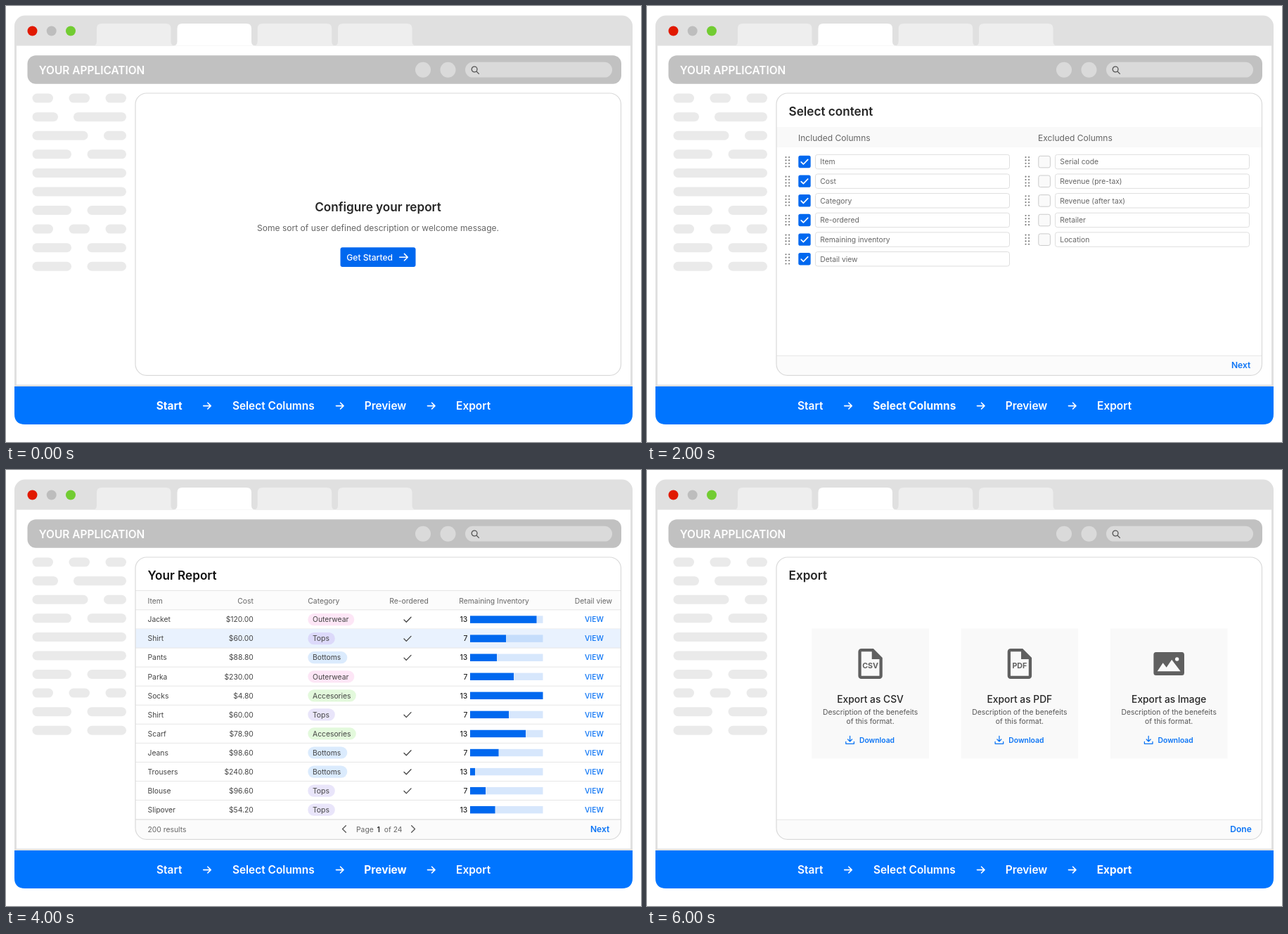
Recreate the animation shown at these times as an HTML page. Size 903 by 620 pixels, loop 8000 ms.

```html
<!DOCTYPE html>
<html lang="en">
<head>
<meta charset="utf-8">
<title>Report builder</title>
<style>
html, body { margin: 0; width: 100%; height: 100%; overflow: hidden; background: #fff; }
svg { display: block; width: 903px; height: 620px; font-family: Inter, sans-serif; }
.scene { visibility: hidden; animation: show 8s step-end infinite; }
.step { font-weight: 600; animation: strong 8s step-end infinite; }
@keyframes show { 0% { visibility: visible; } 25%, 100% { visibility: hidden; } }
@keyframes strong { 0% { font-weight: 700; } 25%, 100% { font-weight: 600; } }
</style>
</head>
<body>
<svg id="stage" viewBox="0 0 903 620"></svg>
<script>
const BLUE = '#0068ef', LINK = '#0b74f5', INK = '#262626', GREY = '#666', RULE = '#e6e6e6';
const XS = 10.34, SM = 12.07, MD = 13.8, LG = 15.45, XL = 17.15;

const rect = (x, y, w, h, fill, r = 0, more = '') =>
  `<rect x="${x}" y="${y}" width="${w}" height="${h}" rx="${r}" fill="${fill}" ${more}/>`;
const circle = (x, y, r, fill) => `<circle cx="${x}" cy="${y}" r="${r}" fill="${fill}"/>`;
const line = (d, color, width = 1, more = '') =>
  `<path d="${d}" fill="none" stroke="${color}" stroke-width="${width}" ${more}/>`;
const round = 'stroke-linecap="round" stroke-linejoin="round"';

// cy is the middle of the capital letters
const text = (s, x, cy, size, fill = INK, weight = 400, anchor = 'start', more = '') =>
  `<text x="${x}" y="${(cy + size * 0.364).toFixed(2)}" font-size="${size}" fill="${fill}" ` +
  `text-anchor="${anchor}" ${weight ? `font-weight="${weight}"` : ''} ${more}>${s}</text>`;

const delay = i => `style="animation-delay:${i * 2 - 8}s"`;
const arrow = (cx, cy, w, h, sw) =>
  line(`M${cx - w / 2} ${cy}h${w}m${-h} ${-h}l${h} ${h}l${-h} ${h}`, '#fff', sw, round);
const tick = (cx, cy, k, color, sw) =>
  line(`M${cx - 5 * k} ${cy + 0.4 * k}l${3.3 * k} ${3.3 * k}l${6.7 * k} ${-7 * k}`, color, sw, round);

function tab(x, fill) {
  return `<path fill="${fill}" d="M${x - 5} 56.5Q${x} 56 ${x} 50V32Q${x} 25 ${x + 7} 25h91.5` +
    `q7 0 7 7v18q0 6 5 6.5z"/>`;
}

function sidebar() {
  const three = [[37.5, 67], [89.5, 119], [141.5, 171]];
  const two = [[37.5, 93], [115.5, 171]];
  const full = [[37.5, 171]];
  const rows = [three, [[37.5, 74], [96, 171]], [[37.5, 116.5], [139, 171]], two, full, full, two, three, two, two];
  return rows.map((row, i) => row.map(([a, b]) =>
    rect(a, (124.6 + i * 26.57).toFixed(2), b - a, 13, '#eaeaea', 6.5)).join('')).join('');
}

function chrome() {
  return rect(12, 13.5, 879, 581.5, '#e0e0e0', 15) +
    rect(15, 56.5, 873, 482, '#fff') +
    circle(37.5, 35.5, 7, '#e11900') + circle(64.7, 35.5, 7, '#bdbdbd') + circle(92, 35.5, 7, '#72cc32') +
    [129, 243.5, 357.7, 472].map((x, i) => tab(x, i === 1 ? '#fff' : '#eee')).join('') +
    rect(30.5, 70.2, 844.5, 40.6, '#c1c1c1', 12) +
    text('YOUR APPLICATION', 46.7, 91, LG, '#fff', 600) +
    circle(593, 90.7, 11, '#dadada') + circle(628.5, 90.7, 11, '#dadada') +
    rect(653, 79.8, 209, 21.8, '#dadada', 10.9) +
    line('M670 90a3.9 3.9 0 1 1-7.8 0a3.9 3.9 0 1 1 7.8 0M669 93l3.4 3.4', '#555', 1.3, round) +
    sidebar() +
    rect(184, 124, 690.5, 401.3, '#fff', 16);
}

function steps() {
  const names = [['Start', 232.2], ['Select Columns', 380.3], ['Preview', 539.5], ['Export', 664.6]];
  return '<path fill="#0075ff" d="M12 541h879v39q0 15-15 15h-849q-15 0-15-15z"/>' +
    names.map(([s, x], i) => text(s, x, 568.2, LG, '#fff', 0, 'middle', `class="step" ${delay(i)}`)).join('') +
    [286, 474.7, 604.7].map(x => arrow(x, 568.6, 10.5, 4.4, 1.6)).join('');
}

const title = s => text(s, 201.5, 149.8, XL, INK, 600);
const foot = s => rect(184, 497, 691, 29, '#fbfbfb') + line('M184 497.3h691', RULE) +
  text(s, 844.6, 511, SM, LINK, 600, 'middle');

function start() {
  return text('Configure your report', 529, 286.2, XL, INK, 600, 'middle') +
    text('Some sort of user defined description or welcome message.', 529, 315.8, SM, GREY, 400, 'middle') +
    rect(475.5, 343.3, 107, 27.6, BLUE, 3) +
    text('Get Started', 484.3, 357.3, SM, '#fff', 500) +
    arrow(565.5, 357.2, 11.5, 4.8, 1.6);
}

function columnList(dx, head, items, on) {
  const dots = cy => [0, 1, 2, 3, 4, 5, 6, 7].map(n =>
    circle(197.5 + dx + (n % 2) * 4.6, cy - 6.5 + (n >> 1) * 4.4, 1.05, '#777')).join('');
  return text(head, 215 + dx, 188, SM, GREY) + items.map((s, i) => {
    const cy = 221.5 + i * 27.65;
    const box = on
      ? rect(215.3 + dx, cy - 8.7, 17.4, 17.4, BLUE, 2.6) + tick(224, cy, 0.95, '#fff', 1.7)
      : rect(215.8 + dx, cy - 8.2, 16.6, 16.6, '#fafafa', 2.6, 'stroke="#cbcbcb"');
    return dots(cy) + box +
      rect(239.5 + dx, cy - 10.2, 276, 20.4, '#fff', 3, 'stroke="#dedede"') +
      text(s, 246.3 + dx, cy + 0.2, XS, GREY);
  }).join('');
}

function select() {
  return title('Select content') + rect(184, 172, 691, 29, '#f9f9f9') +
    columnList(0, 'Included Columns',
      ['Item', 'Cost', 'Category', 'Re-ordered', 'Remaining inventory', 'Detail view'], true) +
    columnList(341, 'Excluded Columns',
      ['Serial code', 'Revenue (pre-tax)', 'Revenue (after tax)', 'Retailer', 'Location'], false) +
    foot('Next');
}

// kind: [label, pill width, pill colour]
const kinds = {
  o: ['Outerwear', 66, '#fde6f6'],
  t: ['Tops', 38.5, '#e9e5fa'],
  b: ['Bottoms', 56, '#dbebfd'],
  a: ['Accesories', 68.5, '#e3f9dc']
};
// item, cost, kind, re-ordered, bar length
const goods = [
  ['Jacket', '120.00', 'o', 1, 94.5], ['Shirt', '60.00', 't', 1, 51], ['Pants', '88.80', 'b', 1, 38],
  ['Parka', '230.00', 'o', 0, 62], ['Socks', '4.80', 'a', 0, 103.5], ['Shirt', '60.00', 't', 1, 55],
  ['Scarf', '78.90', 'a', 0, 79], ['Jeans', '98.60', 'b', 1, 40.5], ['Trousers', '240.80', 'b', 1, 7],
  ['Blouse', '96.60', 't', 1, 22], ['Slipover', '54.20', 't', 0, 35.5]
];

function tableRow([item, cost, kind, again, bar], i) {
  const cy = 212.6 + i * 27.06, hot = i === 1;
  const [label, w, color] = kinds[kind];
  return (hot ? rect(184, cy - 13.6, 691, 27, '#e9f2fe') : '') +
    line(`M184 ${cy + 13.4}h691`, RULE) +
    text(item, 201.5, cy, XS, '#444') +
    text('$' + cost, 351.8, cy, XS, '#444', 400, 'end') +
    rect(429.3, cy - 8.6, w, 17.2, hot ? '#dcd9fa' : color, 8.6) +
    text(label, 436, cy, XS, '#444') +
    (again ? tick(571, cy, 1, '#444', 1.3) : '') +
    text(i % 2 ? 7 : 13, 656.3, cy, XS, INK, 500, 'end') +
    rect(660, cy - 5.2, 103.5, 10.4, hot ? '#c5ddfb' : '#d7e7fc') +
    rect(660, cy - 5.2, bar, 10.4, BLUE) +
    text('VIEW', 836.4, cy, XS, LINK, 500, 'middle');
}

function preview() {
  const heads = [['Item', 201.5], ['Cost', 351.8, 'end'], ['Category', 429.3], ['Re-ordered', 573, 'middle'],
    ['Remaining Inventory', 644.3], ['Detail view', 862, 'end']];
  return text('Your Report', 201.5, 149.8, XL, '#111', 600) +
    rect(184, 171.5, 691, 27, '#fcfcfc') + line('M184 171.5h691M184 198.8h691', RULE) +
    heads.map(([s, x, anchor]) => text(s, x, 186, XS, GREY, 400, anchor)).join('') +
    goods.map(tableRow).join('') + foot('Next') +
    text('200 results', 201.5, 510.8, XS, GREY) +
    line('M483.3 505.8l-4.8 4.7l4.8 4.7M576.7 505.8l4.8 4.7l-4.8 4.7', '#555', 1.3, round) +
    text('Page', 498, 511, XS, GREY) + text('1', 529.7, 511, XS, INK, 600, 'middle') +
    text('of 24', 537.8, 511, XS, GREY);
}

function fileIcon(cx, label) {
  return `<path transform="translate(${cx - 25.8} 249.7) scale(2.15)" fill="#606060" fill-rule="evenodd" ` +
    'd="M14 2H6c-1.1 0-2 .9-2 2v16c0 1.1.9 2 2 2h12c1.1 0 2-.9 2-2V8zM6 20V4h7v5h5v11z"/>' +
    text(label, cx, 278.6, 10.7, '#606060', 700, 'middle');
}

function imageIcon(cx) {
  return rect(cx - 21.8, 259, 43.6, 33, '#606060', 3.5) +
    `<path fill="#f9f9f9" d="M${cx - 16.5} 286.3l8-12l5 6.5l7.5-11l12.5 16.5z"/>` +
    circle(cx + 11.5, 269, 2.7, '#f9f9f9');
}

function card(name, i) {
  const cx = 317.6 + i * 212.3, ix = cx - 29;
  return rect(cx - 83.3, 225.3, 166.6, 185, '#f9f9f9') +
    (i < 2 ? fileIcon(cx, name) : imageIcon(cx)) +
    text('Export as ' + name, cx, 326, MD, INK, 500, 'middle') +
    text('Description of the benefeits', cx, 344.5, XS, '#555', 400, 'middle') +
    text('of this format.', cx, 357.3, XS, '#555', 400, 'middle') +
    line(`M${ix} 378.3v7.5m-3-2.8l3 3l3-3M${ix - 5.8} 386.3v3h11.6v-3`, LINK, 1.25, round) +
    text('Download', cx - 15.6, 384, XS, LINK, 600);
}

const exporting = () => title('Export') + ['CSV', 'PDF', 'Image'].map(card).join('') + foot('Done');

document.getElementById('stage').innerHTML =
  `<clipPath id="panel">${rect(184, 124, 690.5, 401.3, '#fff', 16)}</clipPath>` + chrome() +
  [start, select, preview, exporting].map((draw, i) =>
    `<g class="scene" ${delay(i)}><g clip-path="url(#panel)">${draw()}</g></g>`).join('') +
  rect(184, 124, 690.5, 401.3, 'none', 16, 'stroke="#dadada" stroke-width="1.2"') + steps();
</script>
</body>
</html>
```
